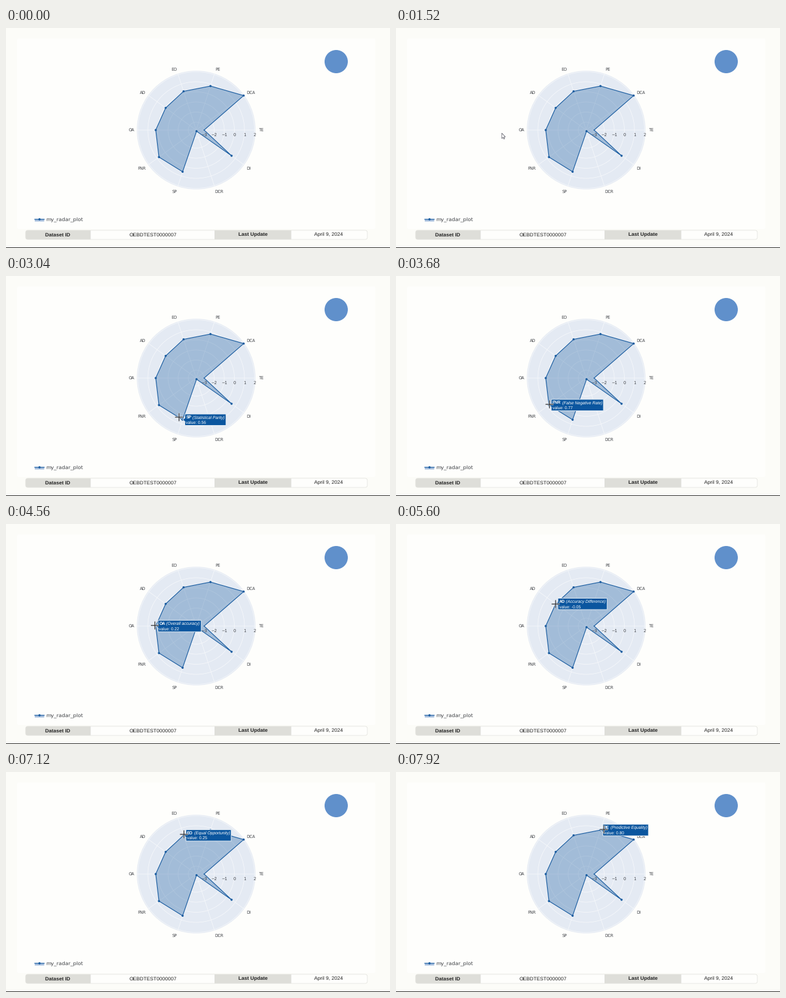
Recreate the animation shown at these times as a matplotlib script. Size 628x360 px, loop 8000 ms.

```python
import numpy as np
import matplotlib
import matplotlib.pyplot as plt
from matplotlib.animation import FuncAnimation
from matplotlib.patches import Circle, FancyBboxPatch, Polygon, Rectangle

matplotlib.rcParams["text.hinting"] = "none"
matplotlib.rcParams["path.snap"] = False

W, H, DPI = 628, 360, 100
STEP, FRAMES = 80, 100
PT = 72 / DPI  # points per pixel
CX, CY, R = 311, 167, 97
UNIT, ZERO = 16.5, 62.5  # pixels per radial unit, radius of value 0
BLUE, TIP, INK = "#195ca0", "#0b569f", "#3f4247"
SANS, WIDE = "Liberation Sans", "DejaVu Sans"

fig = plt.figure(figsize=(W / DPI, H / DPI), dpi=DPI, facecolor="#fcfcf8")
ax = fig.add_axes([0, 0, 1, 1])
ax.set_xlim(0, W)
ax.set_ylim(H, 0)
ax.axis("off")


def label(x, y, s, size, font=SANS, color=INK, ha="center", **kw):
    """Text whose capitals are centred on y; size in pixels."""
    return ax.text(x, y + 0.36 * size - 0.5, s, fontsize=size * PT,
                   family=font, color=color, ha=ha, va="baseline", **kw)


def line(xs, ys, color, width, z, **kw):
    return ax.plot(xs, ys, color=color, lw=width * PT, zorder=z, **kw)[0]


def polar(deg, r):
    a = np.radians(deg)
    return CX + r * np.cos(a), CY - r * np.sin(a)


def draw_page():
    ax.add_patch(FancyBboxPatch((20, 19), 582, 308, fc="#fefefc", ec="none",
                                boxstyle="round,pad=2,rounding_size=2"))
    ax.add_patch(Circle((540, 55), 19, fc="#6090cb", ec="none"))
    ax.add_patch(Rectangle((0, 359), W, 1, fc="#2b2b2b", ec="none"))

    table = FancyBboxPatch((32, 331), 559, 15, fc="#fefefc", ec="none",
                           boxstyle="round,pad=0,rounding_size=4")
    ax.add_patch(table)
    for x, w in ((32, 106.5), (341, 125.5)):
        cell = ax.add_patch(Rectangle((x, 331), w, 15, fc="#deded9", ec="none"))
        cell.set_clip_path(table)
    ax.add_patch(FancyBboxPatch((32, 331), 559, 15, fc="none", ec="#e4e4df",
                                lw=0.8 * PT,
                                boxstyle="round,pad=0,rounding_size=4"))
    for x, s, weight in ((84.7, "Dataset ID", "bold"),
                         (240, "OEBDTEST0000007", "normal"),
                         (403.5, "Last Update", "bold"),
                         (528, "April 9, 2024", "normal")):
        label(x, 338, s, 8.4, color="#222222", weight=weight)


def draw_legend():
    ax.add_patch(Rectangle((47, 313), 15.5, 3.6, fc="#a6bedd", ec="none"))
    line([47, 62.5], [313, 313], BLUE, 1.2, 3)
    ax.add_patch(Circle((54.8, 313), 1.8, fc=BLUE, ec="none", zorder=4))
    label(65, 312.7, "my_radar_plot", 8.5, WIDE, ha="left")


# name, label position, value, full name
METRICS = [
    ("TE", (417, 167), -3.0, ""),
    ("DCA", (400, 106), 2.03, ""),
    ("PE", (346, 68), 0.80, "Predictive Equality"),
    ("EO", (275, 68), 0.25, "Equal Opportunity"),
    ("AD", (224, 106), -0.05, "Accuracy Difference"),
    ("OA", (205, 167), 0.22, "Overall accuracy"),
    ("FNR", (222, 230), 0.77, "False Negative Rate"),
    ("SP", (276, 268), 0.56, "Statistical Parity"),
    ("DCR", (349, 268), -3.67, ""),
    ("DI", (397, 230), 0.55, ""),
]
POINTS = [polar(36 * i, ZERO + UNIT * m[2]) for i, m in enumerate(METRICS)]


def draw_radar():
    ax.add_patch(Circle((CX, CY), R, fc="#e4eaf3", ec="none", zorder=2))
    for v in range(-3, 3):
        ax.add_patch(Circle((CX, CY), ZERO + UNIT * v, fc="none",
                            ec="#f6f8fb", lw=0.8 * PT, zorder=2))
    for i, (name, pos, _, _) in enumerate(METRICS):
        x, y = polar(36 * i, R)
        line([CX, x], [CY, y], "#f6f8fb", 0.8, 2)
        label(*pos, name, 6.6, WIDE)

    ax.add_patch(Polygon(POINTS, fc=BLUE, alpha=0.32, ec="none", zorder=3))
    xs, ys = zip(*(POINTS + POINTS[:1]))
    line(xs, ys, BLUE, 1.15, 4, solid_joinstyle="round")
    for p in POINTS[1:]:
        ax.add_patch(Circle(p, 1.75, fc=BLUE, ec="none", zorder=5))
    for v in range(-3, 3):
        label(CX + ZERO + UNIT * v, 175, str(v).replace("-", "\u2212"),
              6.6, WIDE, zorder=6)


def make_tip(point, name, value, full):
    """Hover box with an arrow towards its data point."""
    x, y = point
    size, left = 6.75, x + 5.6
    style = dict(color="white", ha="left", zorder=11)
    head = label(left, y - 4, name, size, weight="bold", **style)
    nx = left + head.get_window_extent().width + 0.28 * size
    rest = label(nx, y - 4, f"({full})", size, style="italic", **style)
    x0, x1 = x + 3.8, nx + rest.get_window_extent().width + 2
    body = label(left, y + 4.8, f"value: {value:.2f}", size, **style)
    box = ax.add_patch(Polygon(
        [(x, y), (x0, y - 3), (x0, y - 9.3), (x1, y - 9.3),
         (x1, y + 9.3), (x0, y + 9.3), (x0, y + 3)],
        fc=TIP, ec="#eef3f8", lw=0.9 * PT, zorder=10))
    return [box, head, rest, body]


draw_page()
draw_legend()
draw_radar()
TIPS = [(p, make_tip(p, name, value, full))
        for p, (name, _, value, full) in zip(POINTS, METRICS) if full]

ARROW = np.array([(0, 0), (0, 8.8), (2, 7), (3.4, 9.7),
                  (4.7, 9), (3.4, 6.4), (5.9, 6.2)])
arrow = ax.add_patch(Polygon(ARROW, fc="white", ec="#5c5c66",
                             lw=0.8 * PT, zorder=20))
ARM = 6.5
cross = [line([], [], color, width, z, solid_capstyle="butt")
         for color, width, z in (("#f2f4f6", 2.6, 20), ("#2c3036", 1.3, 21))
         for _ in range(2)]

# pointer stops: time in ms, x, y
STOPS = [(1040, -20, 150), (1520, 173, 172), (2080, 228, 226),
         (2800, 283, 231), (3120, 283, 231), (3680, 251, 210),
         (3920, 251, 210), (4560, 243.5, 166), (4960, 243.5, 166),
         (5520, 261, 131), (5760, 261, 131), (6480, 291, 102),
         (7120, 291, 102), (7920, 340, 94)]


def pointer(t):
    if t <= STOPS[0][0]:
        return None
    for (t0, x0, y0), (t1, x1, y1) in zip(STOPS, STOPS[1:]):
        if t <= t1:
            u = (t - t0) / (t1 - t0)
            u = u * u * (3 - 2 * u)
            return x0 + (x1 - x0) * u, y0 + (y1 - y0) * u
    return STOPS[-1][1:]


def update(i):
    pos = pointer(i * STEP)
    inside = pos is not None and np.hypot(pos[0] - CX, pos[1] - CY) < R
    arrow.set_visible(pos is not None and not inside)
    for c in cross:
        c.set_visible(inside)
    if pos is not None:
        x, y = pos
        arrow.set_xy(ARROW + pos)
        for c in cross[::2]:
            c.set_data([x - ARM, x + ARM], [y, y])
        for c in cross[1::2]:
            c.set_data([x, x], [y - ARM, y + ARM])
    for (px, py), parts in TIPS:
        near = inside and np.hypot(pos[0] - px, pos[1] - py) < 11
        for part in parts:
            part.set_visible(near)
    return []


anim = FuncAnimation(fig, update, frames=FRAMES, interval=STEP,
                     init_func=lambda: update(0), repeat=True,
                     repeat_delay=0, blit=False)
plt.show()
```
